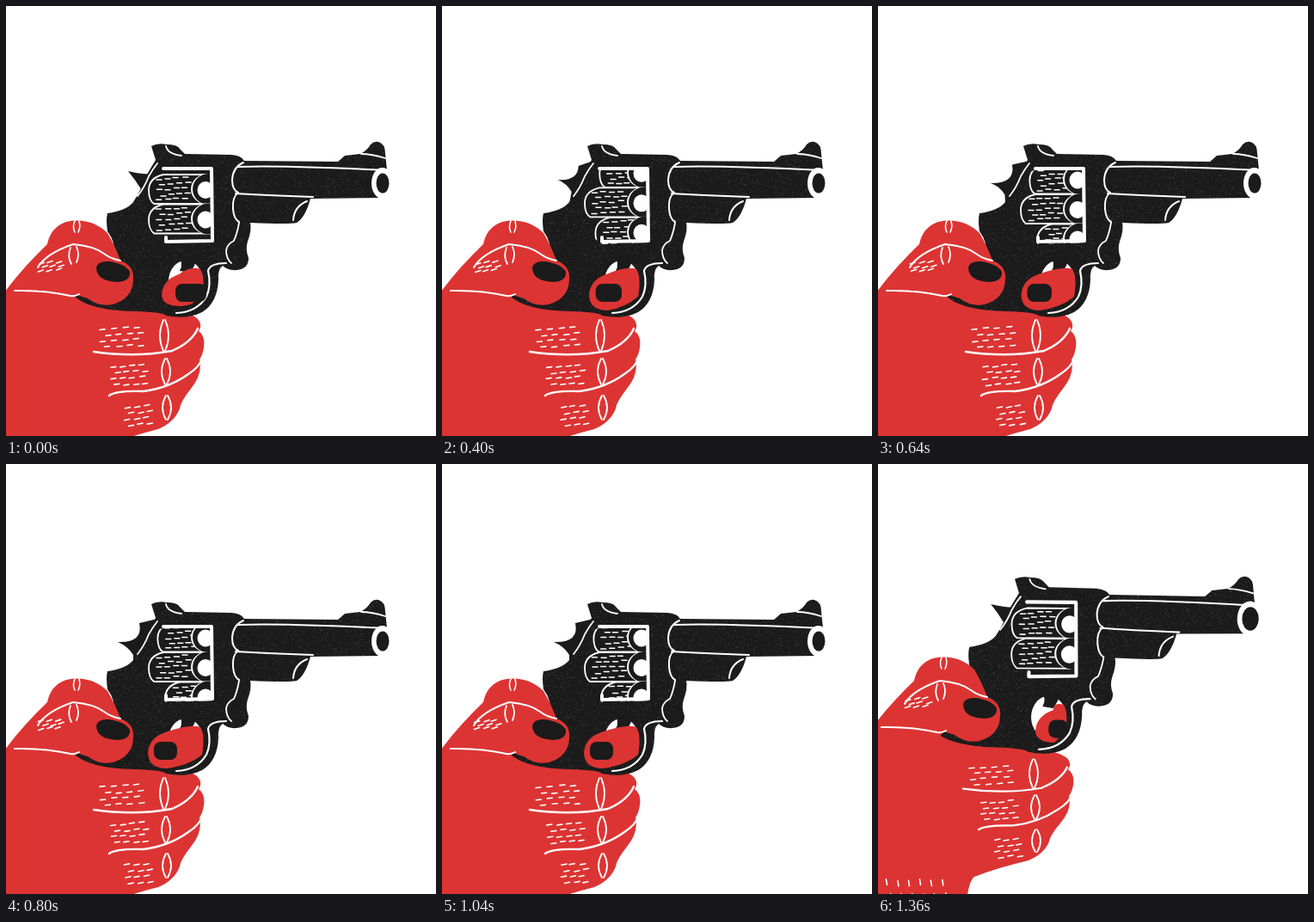
Recreate the animation shown at these times as an HTML page with a canvas. Size 500 by 500 pixels, loop 1.44 s.

```html
<!DOCTYPE html>
<html>
<head>
<meta charset="utf-8">
<style>
html, body { margin: 0; width: 100%; height: 100%; overflow: hidden; background: #fff; }
canvas { display: block; }
</style>
</head>
<body>
<canvas id="stage" width="500" height="500"></canvas>
<script>
const ctx = document.getElementById('stage').getContext('2d');
const STEP = 80, STEPS = 18;
const RED = '#dc3433', BLACK = '#1b1b1b', WHITE = '#fff';

const BODY = new Path2D(`M174 179 L169 163 Q176 159 187 161 Q199 161 202 166 L208 172 L262 173
  Q274 174 277 180 L386 181 L394 174 L412 172 Q420 168 424 161 Q428 157 433 158 Q441 160 441 172 L443 191
  Q450 200 448 212 Q444 223 436 223 L354 224 Q348 246 338 252 Q330 254 284 252 Q286 260 281 274
  Q278 282 282 293 Q282 306 268 307 Q258 308 252 302 Q246 306 247 318 Q246 345 228 356
  Q210 365 186 360 Q184 356 150 355 Q95 354 78 336 L125 290 Q128 275 118 262 Q116 248 118 241
  Q140 238 148 228 Q158 212 165 194Z`);
const WINDOW = new Path2D('M182 187 L240 187 L241 275 L186 277 L180 272 Q162 264 162 231 Q163 194 182 191Z');
const FINGERS = `M-120 380 L80 330 L190 352 Q215 356 223 364 Q229 370 224 378 Q232 384 230 397
  Q229 405 225 411 Q229 428 215 445 Q203 460 202 468 Q196 484 177 492 Q145 500 115 512
  Q103 520 102 620 L-120 640Z`;
const BENT_FIST = `M-20 265 L55 273 Q130 292 190 284 Q205 285 203 296 Q212 305 207 316 Q213 335 206 348
  Q203 370 185 388 Q160 420 120 434 Q85 449 68 450 Q56 465 50 505 L-20 510Z`;
const THUMB = `M-120 440 L-40 365 Q-8 342 2 328 Q20 304 48 277 Q52 257 70 251 Q98 245 118 264
  Q127 279 133 296 Q149 302 148 317 Q148 340 124 347 Q108 350 95 340 L82 336 L60 370 L-120 480Z`;

// step, finger left, nail x, nail width, then hammer top, notch, tip, underside, cylinder offset
const ACTION = [
  [0, 181, 197, 36, 166, 195, 160, 196, 142, 192, 157, 213, 0],
  [3, 177, 186, 31, 162, 190, 155, 201, 140, 196, 158, 214, 0],
  [6, 168, 175, 30, 157, 184, 160, 205, 132, 205, 147, 217, 23],
  [10, 165, 172, 27, 155, 185, 160, 208, 130, 207, 148, 222, 23],
  [13, 165, 172, 27, 155, 185, 160, 208, 130, 207, 148, 222, 23]
];
const FIRED = [0, 194, 209, 22, 166, 195, 160, 196, 142, 192, 157, 213, 0];

// gun and fingers: x, y, degrees, scale x, scale y, skew; thumb: shift
const REST = { gun: [437, 206, 0, 1, 1], fingers: [184, 383, 0, 1, 1], thumb: [0, 0] };
const RECOIL = {
  14: { gun: [469, 124, -8, 1.08, 1.08], fingers: [215, 352, -4, 1.05, 1], thumb: [31, -30] },
  15: { gun: [383, 95, -9.6, .952, .957], fingers: [143, 311, 0, 1.1, .92, .2], thumb: [-25, -64] },
  16: { gun: [412, 137, -4, .99, .99], fingers: [163, 337, -4, 1.05, .95], thumb: [-16, -45] },
  17: { gun: [432, 180, .5, 1.02, 1.02], fingers: [181, 360, 0, 1, .93], thumb: [-6, -25] }
};

let seed = 1;
const random = () => (seed = seed * 16807 % 2147483647) / 2147483647;
const path = d => d instanceof Path2D ? d : new Path2D(d);

function fill(d, color) {
  ctx.fillStyle = color;
  ctx.fill(path(d));
}

function line(d, width = 2) {
  ctx.strokeStyle = WHITE;
  ctx.lineWidth = width;
  ctx.stroke(path(d));
}

function oval(x, y, rx, ry, color) {
  ctx.beginPath();
  ctx.ellipse(x, y, rx, ry, 0, 0, 7);
  ctx.fillStyle = color;
  ctx.fill();
}

function dashes(x, y, cols, rows, dx, dy, lx, ly, width = 1.6) {
  for (let r = 0; r < rows; r++) {
    for (let c = 0; c < cols; c++) {
      const px = x + c * dx + (r % 2) * dx * .4 + random() * 2 - 1;
      const py = y + r * dy - (lx > ly ? c * .8 : 0) + random() * 2 - 1;
      line(`M${px} ${py} l${lx} ${ly}`, width);
    }
  }
}

function placed(anchorX, anchorY, [x, y, degrees, sx, sy, skew = 0], draw) {
  ctx.save();
  ctx.translate(x, y);
  ctx.transform(sx, 0, skew, sy, 0, 0);
  ctx.rotate(degrees * Math.PI / 180);
  ctx.translate(-anchorX, -anchorY);
  draw();
  ctx.restore();
}

function actionAt(step) {
  if (step > 13) return FIRED;
  const i = Math.max(1, ACTION.findIndex(k => k[0] >= step));
  const a = ACTION[i - 1], b = ACTION[i];
  const p = (step - a[0]) / (b[0] - a[0]);
  return a.map((v, j) => v + (b[j] - v) * p);
}

function lens(x, y, h) {
  line(`M${x} ${y - h} q-8 ${h} 0 ${2 * h} M${x + 2} ${y - h} q8 ${h} 0 ${2 * h}`, 1.8);
}

function drawFingerLines() {
  line('M102 402 Q150 409 193 401 Q216 391 223 375', 2.4);
  line('M120 453 Q128 447 160 448 Q190 444 212 428 Q226 419 229 408', 2.4);
  lens(183, 383, 18);
  lens(185, 425, 15);
  lens(186, 467, 14);
  dashes(110, 376, 4, 4, 13, 7, 6, -.6);
  dashes(122, 420, 4, 4, 11, 7, 6, -.8);
  dashes(138, 467, 3, 4, 11, 7, 6, -1.2);
  dashes(12, 516, 6, 4, 13, 17, 1, 7);
}

function drawThumb() {
  fill(THUMB, RED);
  line('M37 304 Q46 288 78 277 Q102 279 114 288 Q122 294 133 296');
  line('M10 331 Q45 330 75 337 Q80 338 85 335');
  line('M80 250 q-3 7 0 13 M85 250 q2 7 -1 13', 1.6);
  line('M75 281 q-4 10 1 19 M82 280 q4 9 0 18', 1.8);
  dashes(38, 300, 3, 3, 10, 4.5, 6, -2);
  fill('M105 304 Q107 296 120 297 Q139 300 144 309 Q145 320 130 321 Q105 320 105 304Z', BLACK);
}

function drawCylinder(offset) {
  ctx.save();
  ctx.clip(WINDOW);
  for (let k = -1; k < 3; k++) {
    const y = 213 + 34.5 * k + offset, fromAxis = Math.abs(y - 231);
    if (fromAxis > 45) continue;
    const left = 166 + Math.max(0, fromAxis - 18) * .9;
    const lobe = `M245 ${y - 17} H${left + 17} Q${left} ${y - 13} ${left} ${y + 1} Q${left} ${y + 13} ${left + 6} ${y + 17} H245Z`;
    fill(lobe, BLACK);
    line(lobe, 1.8);
    dashes(left + 9, y - 11, 4, 5, 10, 6, 6, 0, 1.5);
    oval(235, y, 20, 18, WHITE);
    oval(236, y, 19, 18, BLACK);
    oval(232, y + 1, 9.5, 10, WHITE);
  }
  ctx.restore();
  line('M183 189 H239 L240 273 L186 274 V269', 4);
}

function drawGun([, , , , px, py, mx, my, tx, ty, ux, uy, offset], open, bulge) {
  fill(`M176 180 L${px} ${py} Q${mx} ${my} ${tx} ${ty} Q${ux - 6} ${uy - 10} ${ux} ${uy} L148 230 L175 225Z`, BLACK);
  fill(BODY, BLACK);
  ctx.save();
  ctx.clip(BODY);
  ctx.fillStyle = 'rgba(255,255,255,.13)';
  for (let i = 0; i < 5000; i++) ctx.fillRect(78 + random() * 370, 158 + random() * 205, 1, 1);
  ctx.restore();

  drawCylinder(offset);
  line('M176 183 Q171 189 166 198 Q161 211 153 221', 1.8);
  line('M186 163 Q188 172 204 174 M413 172 Q425 172 441 177', 1.8);
  line('M270 187 Q320 185 443 191 M267 218 Q300 220 357 222');
  line('M276 182 Q264 187 263 202 Q263 214 270 217 Q263 222 264 236 Q265 248 271 251');
  line('M271 252 Q269 264 265 273 Q257 277 256 284 Q256 294 262 299', 1.8);
  line('M350 227 Q335 233 334 249');
  if (open) {
    oval(209, 320, 20, 24, WHITE);
    fill('M200 290 L222 293 Q220 302 214 310 L202 308 Q207 299 200 290Z', BLACK);
  }
  line('M256 299 Q237 299 235 308 Q239 325 233 338 Q222 356 198 357', 2.2);
  oval(437.5, 206, 12.5 + bulge, 18 + bulge, WHITE);
  oval(438, 206, 7.5 + bulge, 11.5 + bulge, BLACK);
}

function drawTrigger([, left, nailX, nailW]) {
  const low = left < 176 ? 354 : 349;
  fill(`M${left} 335 Q${left + 2} 318 ${left + 20} 312 Q215 302 226 306 Q232 316 228 338
    Q214 350 ${left + 22} ${low} Q${left} ${low} ${left} 335Z`, RED);
  ctx.fillStyle = BLACK;
  ctx.beginPath();
  ctx.roundRect(nailX, 323, nailW, 21, 8);
  ctx.fill();
}

function drawLooseFinger() {
  fill('M212 233 Q222 253 220 266 Q214 279 201 281 Q209 260 212 233Z', RED);
  fill('M117 262 Q117 244 134 238 Q165 236 182 224 Q193 240 192 264 Q191 281 172 284 Q148 290 130 284 Q117 278 117 262Z', RED);
  fill('M120 255 Q123 247 140 249 Q148 252 147 263 Q146 273 135 273 Q118 274 120 255Z', BLACK);
  line('M117 265 Q114 246 130 239 M174 251 q6 12 1 28 M178 251 q4 12 1 25 M183 223 Q194 238 192 264', 1.8);
}

function draw(step) {
  const pose = RECOIL[step] || REST, action = actionAt(step), loose = step === 15;
  seed = 97 + step * 131;
  ctx.fillStyle = WHITE;
  ctx.fillRect(0, 0, 500, 500);
  if (loose) fill(BENT_FIST, RED);
  placed(184, 383, pose.fingers, () => {
    if (!loose) fill(FINGERS, RED);
    drawFingerLines();
  });
  placed(437, 206, pose.gun, () => {
    drawGun(action, !loose, step > 13 ? 2 : 0);
    if (!loose) drawTrigger(action);
  });
  placed(0, 0, [...pose.thumb, 0, 1, 1], drawThumb);
  if (loose) drawLooseFinger();
}

ctx.lineCap = ctx.lineJoin = 'round';
let shown = -1;
function tick() {
  const step = Math.floor(performance.now() / STEP) % STEPS;
  if (step !== shown) draw(shown = step);
  requestAnimationFrame(tick);
}
tick();
</script>
</body>
</html>
```
